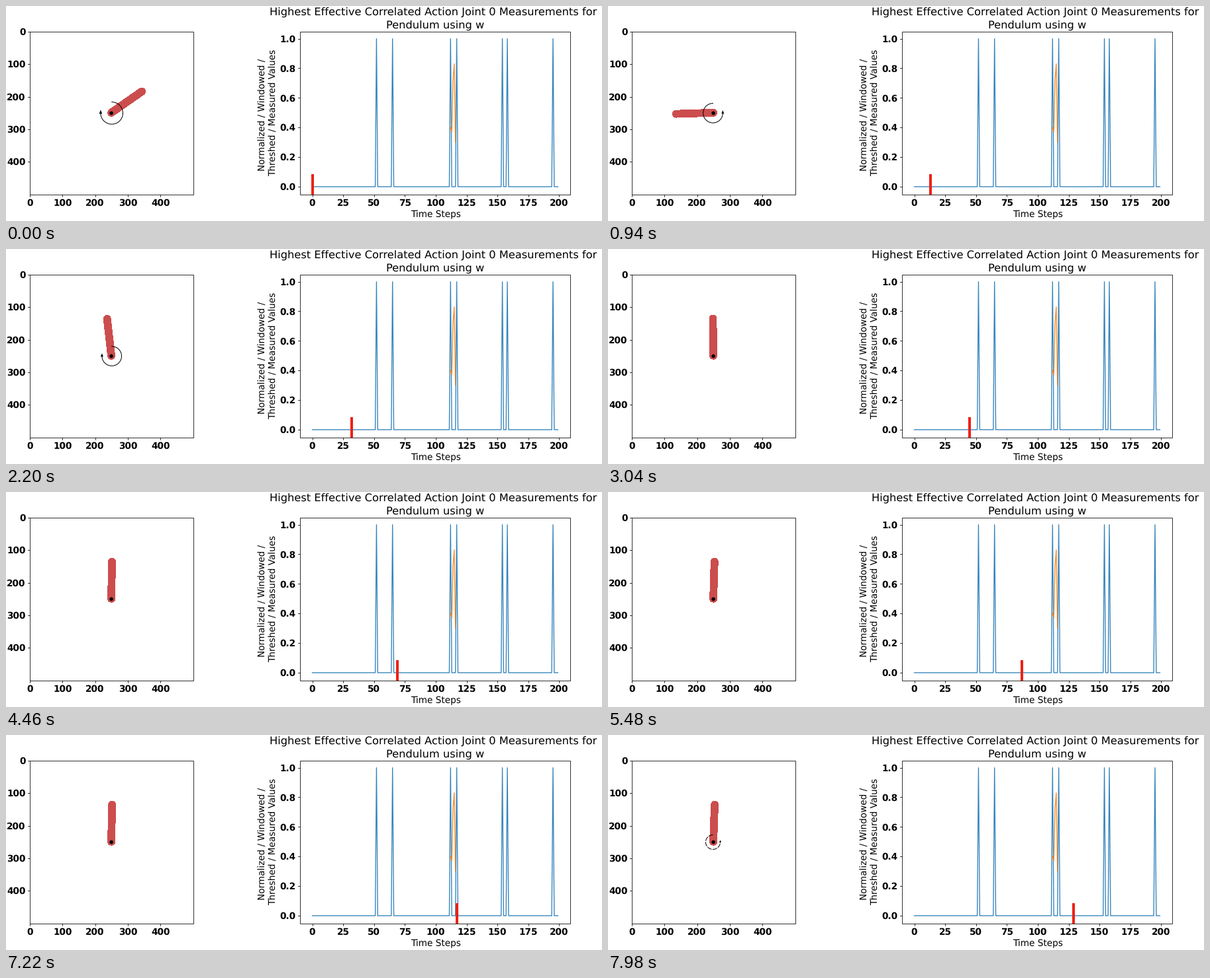
Write a matplotlib script that moves like this. It is 900 px wide and 326 px high and loops after 8000 ms.

```python
import numpy as np
import matplotlib.pyplot as plt
from matplotlib.animation import FuncAnimation
from matplotlib.patches import Circle, Polygon, Rectangle

W, H, DPI = 900, 326, 64
PT = 72 / DPI                      # points per pixel
FRAMES, INTERVAL = 400, 20
BASE, TITLE = 13.65, 16.3          # font sizes in pixels

plt.rcParams["font.family"] = "DejaVu Sans"
plt.rcParams["text.hinting"] = "none"
fig = plt.figure(figsize=(W / DPI, H / DPI), dpi=DPI, facecolor="white")
ax = fig.add_axes([0, 0, 1, 1])
ax.set_xlim(0.5, W + 0.5)
ax.set_ylim(H + 0.5, 0.5)
ax.axis("off")


def text(x, y, s, size=BASE, ha="center", **kw):
    ax.text(x, y, s, fontsize=size * PT, ha=ha, va="baseline", **kw)


def line(x, y, color="black", lw=0.8, **kw):
    return ax.plot(x, y, color=color, lw=lw * PT, **kw)[0]


def panel(x0, x1, y0, y1, xticks, yticks):
    """Frame with ticks; ticks are (pixel, label) pairs."""
    ax.add_patch(Rectangle((x0, y0), x1 - x0, y1 - y0, fill=False,
                           ec="black", lw=0.8 * PT, zorder=5))
    for x, label in xticks:
        line([x, x], [y1, y1 + 3.2])
        text(x, y1 + 16.7, label, weight="bold")
    for y, label in yticks:
        line([x0 - 3.2, x0], [y, y])
        text(x0 - 6.4, y + 5, label, ha="right", weight="bold")


# Left panel: a 500 x 500 view of the pendulum
TOP, BOTTOM = 39.4, 286.2
LEFT, UNIT = 36.5, 0.4932
marks = range(0, 500, 100)
panel(LEFT, 283, TOP, BOTTOM,
      [(LEFT + UNIT * v, str(v)) for v in marks],
      [(TOP + UNIT * v, str(v)) for v in marks])

# Right panel: measurements over time
X0, DX = 463.05, 1.8638
Y0, DY = 274.5, 224.4


def sx(step):
    return X0 + DX * np.asarray(step)


def sy(value):
    return Y0 - DY * np.asarray(value)


panel(444.5, 852.5, TOP, BOTTOM,
      [(sx(v), str(v)) for v in range(0, 201, 25)],
      [(sy(v / 10), f"{v / 10:.1f}") for v in range(0, 11, 2)])

text(646.1, 14.5, "Highest Effective Correlated Action Joint 0 Measurements for", TITLE)
text(648.3, 33.8, "Pendulum using w", TITLE)
text(649, 320.3, "Time Steps")
upright = dict(rotation=90, rotation_mode="anchor")
text(391.3, 165, "Normalized / Windowed /", **upright)
text(407.3, 162.6, "Threshed / Measured Values", **upright)

spikes = np.zeros(200)
spikes[[52, 65, 112, 117, 154, 158, 195]] = 1
line(sx(np.arange(200)), sy(spikes), "#1f77b4", 1.36, alpha=0.9)
line(sx(np.arange(112, 117)), sy([0.40, 0.37, 0.72, 0.83, 0.30]),
     "#ff7f0e", 1.36, alpha=0.9)

# Pendulum: 0 is up, counterclockwise positive
STEPS, CAUGHT, DT = 130, 13, 0.05
steps = np.arange(STEPS)


def swing(angle=-0.96, speed=-0.7, torque=-1.3):
    """Free swing under gravity and a steady torque."""
    for _ in range(CAUGHT):
        yield angle
        speed += (15 * np.sin(angle) + 3 * torque) * DT
        speed = np.clip(speed, -8, 8)
        angle += speed * DT


def settle(k):
    """Ease from the left side to upright, then sway slightly."""
    return np.radians(-361 + 92 * np.exp(-(k - CAUGHT) / 8)
                      + np.cos(np.pi * (k - 105) / 24))


angles = np.concatenate([list(swing()), settle(steps[CAUGHT:])])


def torque_radius(k):
    """Signed size of the torque arrow, clockwise positive."""
    if k < CAUGHT:
        return 16.8
    if k < 42:
        return -14.8 * np.cos(np.pi * (k - CAUGHT) / 19)
    return -2.2 * max(0, k - 124)


PX, PY, ROD = 159.6, 162.9, 56.2
RX, RY = PX, PY - 0.6
rod = line([RX, RX], [RY, RY - ROD], "#cc4d4d", 10.8,
           solid_capstyle="round", antialiased=False, zorder=6)
ax.add_patch(Circle((PX, PY), 2.8, fc="black", lw=0, zorder=8))
arc = line([], [], lw=1, zorder=7)
head = ax.add_patch(Polygon([(0, 0)] * 3, fc="black", lw=0, zorder=7))
cursor = line([X0, X0], [256, BOTTOM], "#ee2015", 4,
              solid_capstyle="butt", zorder=9)
sweep = np.radians(np.linspace(90, -180, 60))


def step_at(seconds):
    """Playback runs slightly faster after about three seconds."""
    pos = 14.87 * seconds + 2.33 * max(0, seconds - 3.04)
    return min(int(pos), STEPS - 1)


def draw_arrow(signed):
    r, side = abs(signed), np.sign(signed)
    shown = r > 4
    arc.set_visible(shown)
    head.set_visible(shown)
    if not shown:
        return
    cx, cy, k = PX + 0.6 * side, PY, r / 17
    arc.set_data(cx + side * r * np.cos(sweep), cy - r * np.sin(sweep))
    arc.set_linestyle("-" if r > 13 else (0, (7, 1.5)))
    hx = cx - side * r
    head.set_xy([(hx, cy - 5 * k), (hx - 2.3 * k, cy + k), (hx + 2.3 * k, cy + k)])


def update(i):
    step = step_at(i * INTERVAL / 1000)
    a = angles[step]
    rod.set_data([RX, RX - ROD * np.sin(a)], [RY, RY - ROD * np.cos(a)])
    draw_arrow(torque_radius(step))
    x = float(sx(step))
    cursor.set_xdata([x, x])
    return rod, arc, head, cursor


anim = FuncAnimation(fig, update, frames=FRAMES, interval=INTERVAL,
                     init_func=lambda: update(0), repeat=True, repeat_delay=0)
plt.show()
```
